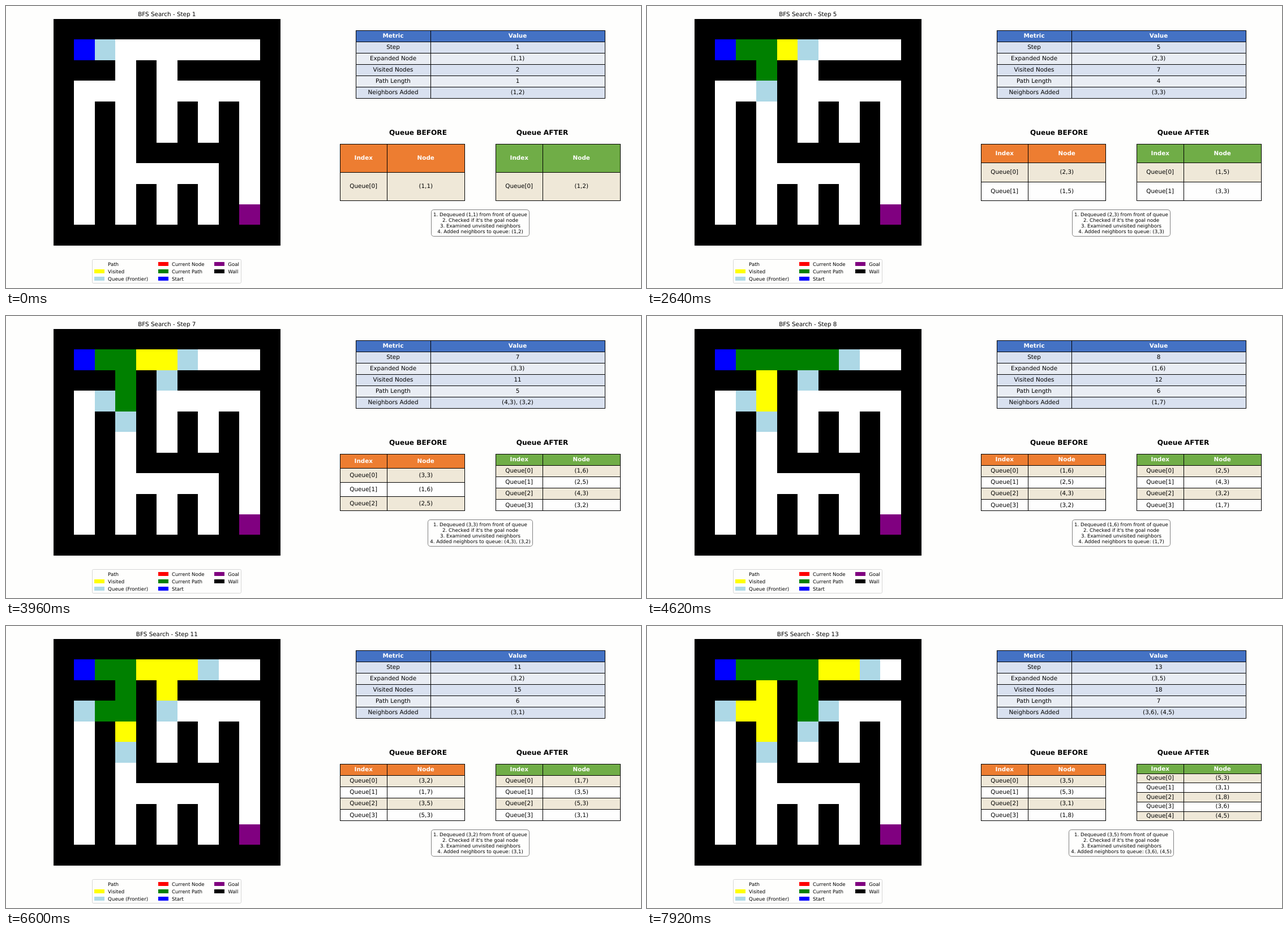
Recreate the animation shown at these times as an HTML page with a canvas. Size 1122 by 499 pixels, loop 8000 ms.

```html
<!DOCTYPE html>
<html lang="en">
<head>
<meta charset="utf-8">
<title>BFS Search</title>
<style>
html, body { margin: 0; width: 100%; height: 100%; overflow: hidden; background: #fefefd; }
canvas { display: block; width: 1122px; height: 499px; }
</style>
</head>
<body>
<canvas id="stage" width="1122" height="499"></canvas>
<script>
const ctx = document.getElementById('stage').getContext('2d');
const LOOP = 8000, STEP_MS = 660;
const PT = 1122 / 18 / 72; // pixels per point
const COLORS = {
  paper: '#fefefd', visited: '#ffff00', frontier: '#add8e6', current: '#ff0000',
  path: '#008000', start: '#0000ff', goal: '#800080', wall: '#000000'
};

const MAZE = [
  '###########',
  '#.........#',
  '###.#.#####',
  '#...#.....#',
  '#.#.#.#.#.#',
  '#.#.#.#.#.#',
  '#.#.#####.#',
  '#.#.....#.#',
  '#.#.#.#.#.#',
  '#.#.#.#.#.#',
  '###########'
];
const START = '1,1', GOAL = '9,9';
const MOVES = [[0, 1], [1, 0], [0, -1], [-1, 0]];

// Breadth-first search, keeping a snapshot of every step
function search(count) {
  const parent = new Map([[START, null]]);
  const steps = [];
  let queue = [START];
  while (queue.length && steps.length < count) {
    const before = queue;
    const node = queue[0];
    const [r, c] = node.split(',').map(Number);
    const added = [];
    for (const [dr, dc] of MOVES) {
      const next = `${r + dr},${c + dc}`;
      if (MAZE[r + dr][c + dc] === '#' || parent.has(next)) continue;
      parent.set(next, node);
      added.push(next);
    }
    queue = queue.slice(1).concat(added);
    const path = [];
    for (let n = node; n; n = parent.get(n)) path.push(n);
    steps.push({ node, before, after: queue, added, path, visited: [...parent.keys()] });
  }
  return steps;
}
const steps = search(Math.ceil(LOOP / STEP_MS));

const label = node => `(${node})`;

function text(str, x, y, pt, { bold = false, color = '#000', align = 'center' } = {}) {
  ctx.font = `${bold ? 'bold ' : ''}${pt * PT}px "DejaVu Sans", sans-serif`;
  ctx.fillStyle = color;
  ctx.textAlign = align;
  ctx.fillText(str, x, y);
}

function box(x, y, w, h, color) {
  ctx.fillStyle = color;
  ctx.fillRect(x, y, w, h);
}

function drawMaze(step) {
  const edgeX = i => Math.round(84 + 36.45 * i);
  const edgeY = i => Math.round(22.9 + 36.45 * i);
  const cell = (r, c, color) =>
    box(edgeX(c), edgeY(r), edgeX(c + 1) - edgeX(c), edgeY(r + 1) - edgeY(r), color);
  const paint = (nodes, color) => nodes.forEach(n => cell(...n.split(',').map(Number), color));

  MAZE.forEach((row, r) => [...row].forEach((ch, c) =>
    cell(r, c, ch === '#' ? COLORS.wall : '#ffffff')));
  paint(step.visited, COLORS.visited);
  paint(step.after, COLORS.frontier);
  paint(step.path, COLORS.path);
  paint([START], COLORS.start);
  paint([GOAL], COLORS.goal);
}

function drawLegend() {
  const columns = [
    [156, 180.1, [['Path', COLORS.paper], ['Visited', COLORS.visited], ['Queue (Frontier)', COLORS.frontier]]],
    [269, 292.9, [['Current Node', COLORS.current], ['Current Path', COLORS.path], ['Start', COLORS.start]]],
    [368, 392.3, [['Goal', COLORS.goal], ['Wall', COLORS.wall]]]
  ];
  ctx.strokeStyle = '#d6d6d6';
  ctx.lineWidth = 1;
  ctx.beginPath();
  ctx.roundRect(152.5, 448.5, 263, 42, 2);
  ctx.stroke();
  for (const [x, textX, items] of columns) {
    items.forEach(([name, color], i) => {
      box(x, 453 + 13 * i, 18, 7, color);
      text(name, textX, 459.6 + 12.95 * i, 10, { align: 'left' });
    });
  }
}

// rows[0] is the header; fills alternate below it
function drawTable({ x, y, h, widths, head, fills, rows }) {
  const [w1, w2] = widths;
  const lineX = [x, x + w1, x + w1 + w2].map(Math.floor);
  const lineY = i => Math.round(y + h * i / rows.length);
  const width = lineX[2] - lineX[0];
  rows.forEach((row, i) => {
    const top = lineY(i), bottom = lineY(i + 1);
    box(lineX[0], top, width, bottom - top, i ? fills[(i - 1) % 2] : head);
    const style = i ? {} : { bold: true, color: '#fff' };
    const base = y + 0.3 + h * (i + 0.5) / rows.length + 0.276 * 12 * PT;
    text(row[0], x + w1 / 2, base, 12, style);
    text(row[1], x + w1 + w2 / 2, base, 12, style);
  });
  for (let i = 0; i <= rows.length; i++) box(lineX[0], lineY(i), width + 1, 1, '#000');
  for (const lx of lineX) box(lx, lineY(0), 1, lineY(rows.length) - lineY(0) + 1, '#000');
}

function drawQueue(title, titleX, x, head, queue) {
  text(title, titleX, 228, 14, { bold: true });
  drawTable({
    x, y: 244, h: 100.4, widths: [82.5, 137.5], head, fills: ['#efe8d8', '#fefefe'],
    rows: [['Index', 'Node'], ...queue.map((n, i) => [`Queue[${i}]`, label(n)])]
  });
}

function drawNotes(step, added) {
  const lines = [
    `1. Dequeued ${label(step.node)} from front of queue`,
    "2. Checked if it's the goal node",
    '3. Examined unvisited neighbors',
    `4. Added neighbors to queue: ${added}`
  ];
  ctx.font = `${10 * PT}px "DejaVu Sans", sans-serif`;
  const w = Math.max(...lines.map(s => ctx.measureText(s).width)) + 10 * PT;
  ctx.strokeStyle = '#808080';
  ctx.lineWidth = 1;
  ctx.beginPath();
  ctx.roundRect(Math.round(838 - w / 2) + 0.5, 360.5, Math.round(w) - 1, 47, 4.3);
  ctx.stroke();
  lines.forEach((s, i) => text(s, 838, 371.8 + 10.05 * i, 10));
}

function draw(index) {
  const step = steps[index];
  const added = step.added.map(label).join(', ');
  box(0, 0, 1122, 499, COLORS.paper);
  ctx.textRendering = 'geometricPrecision';

  text(`BFS Search - Step ${index + 1}`, 284.3, 18, 12);
  drawMaze(step);
  drawLegend();
  drawTable({
    x: 618, y: 43, h: 120.3, widths: [132, 308], head: '#4472c4', fills: ['#d9e1f0', '#e9edf4'],
    rows: [
      ['Metric', 'Value'],
      ['Step', index + 1],
      ['Expanded Node', label(step.node)],
      ['Visited Nodes', step.visited.length],
      ['Path Length', step.path.length],
      ['Neighbors Added', added]
    ]
  });
  drawQueue('Queue BEFORE', 728, 590.5, '#ed7d31', step.before);
  drawQueue('Queue AFTER', 947.5, 865.5, '#70ad47', step.after);
  drawNotes(step, added);
}

const begin = performance.now();
function tick() {
  const t = (performance.now() - begin) % LOOP;
  draw(Math.floor(t / STEP_MS));
  requestAnimationFrame(tick);
}
tick();
</script>
</body>
</html>
```
